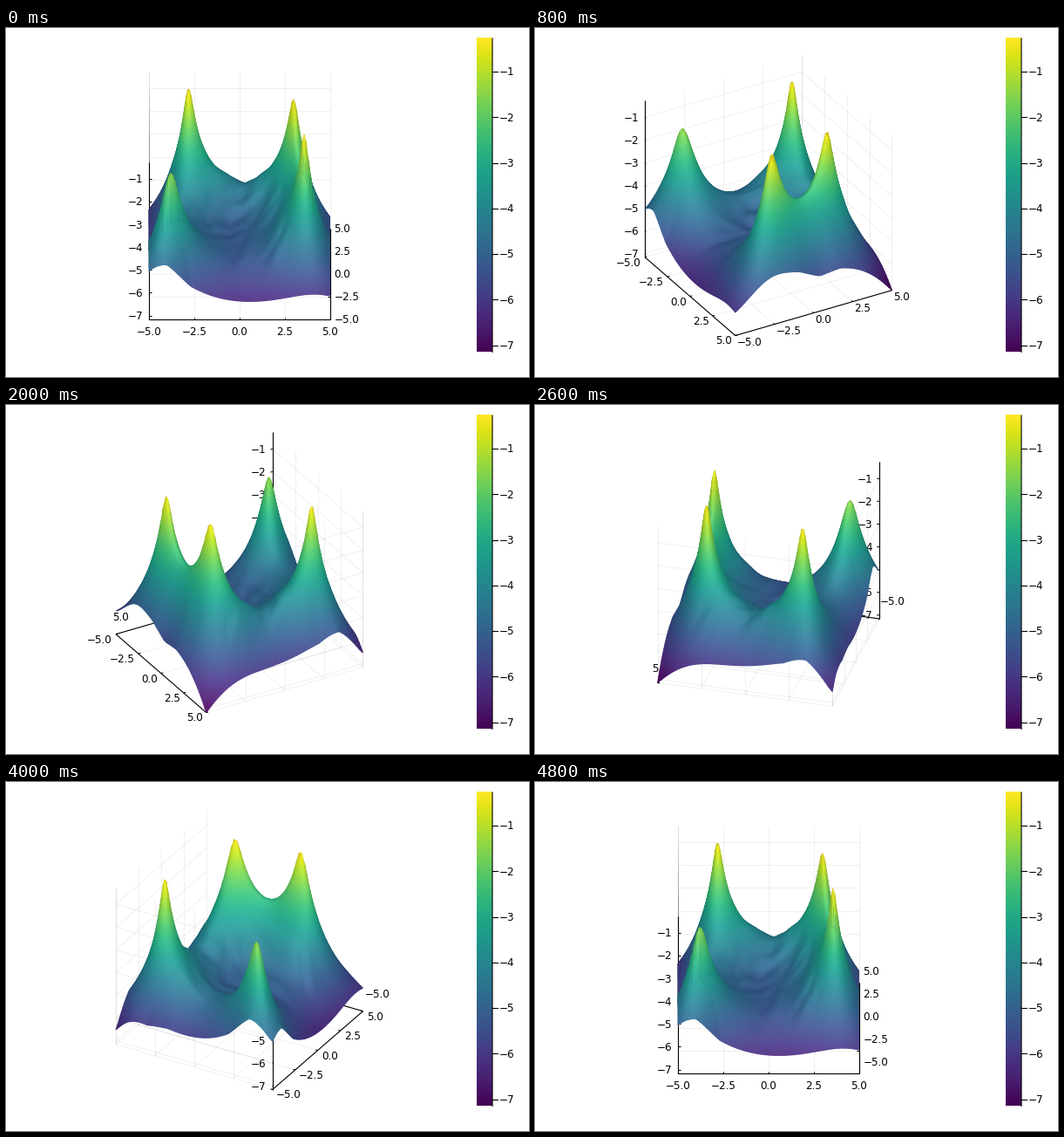
Write a matplotlib script that moves like this. It is 600 by 400 pixels and loops after 4870 ms.

```python
import numpy as np
import matplotlib.pyplot as plt
from matplotlib.animation import FuncAnimation
from matplotlib.collections import LineCollection, TriMesh
from matplotlib.tri import Triangulation

POSES, LOOP_MS = 73, 4870
HOLD = 3                                  # ticks per camera pose
STEP_DEG, ELEVATION = 5, np.radians(30)
CX, CY, HALF = 267.75, 191.8, 103.75      # cube centre and half side in pixels
Z_MIN, Z_MAX = -7.153, -0.262
CMAP = plt.get_cmap("viridis")
FONT_PT = 8.64


def norm_z(z):
    return 2 * (z - Z_MIN) / (Z_MAX - Z_MIN) - 1


def project(p, az):
    """Orthographic view of points in the cube [-1, 1]^3."""
    x, y, z = np.moveaxis(np.asarray(p, float), -1, 0)
    depth = np.sin(az) * x - np.cos(az) * y
    sx = CX + HALF * (np.cos(az) * x + np.sin(az) * y)
    sy = CY + HALF * (np.sin(ELEVATION) * depth - np.cos(ELEVATION) * z)
    return np.stack([sx, sy], axis=-1)


# ---- surface ----

def grid_line(n):
    """Grid positions that crowd together where the peaks are."""
    t = np.linspace(-5, 5, 2001)
    total = np.cumsum(1 + 1.8 * np.exp(-((np.abs(t) - 3) / 0.9) ** 2))
    total = (total - total[0]) / (total[-1] - total[0])
    return np.interp(np.linspace(0, 1, n), total, t)


def hat(t):
    return np.clip(1 - np.abs(t), 0, None)


def border_shift(x, y):
    """Lift or drop towards the corners, plus a few bends on the border."""
    u, v = x / 5, y / 5
    out = (0.02 - 0.065 * u - 0.325 * v) * np.abs(u * v) ** 4
    for px, py, amp in [(-4, -5, .35), (-5, -3.5, .3), (-3.5, 5, .3),
                        (5, .4, -.25), (-5, 3, -.2)]:
        out += amp * hat(np.hypot(x - px, y - py) / 1.3)
    return out


def creases(x, y):
    """Short straight folds in the valley."""
    rng = np.random.default_rng(4)
    out = np.zeros_like(x)
    for _ in range(36):
        px, py = rng.uniform(-3.5, 3.5, 2)
        ang = rng.uniform(0.2, 1.5)
        across = (x - px) * np.sin(ang) - (y - py) * np.cos(ang)
        along = (x - px) * np.cos(ang) + (y - py) * np.sin(ang)
        amp = rng.uniform(0.08, 0.18) * rng.choice([-1, 1])
        out += amp * hat(across / rng.uniform(.35, .7)) * hat(along / rng.uniform(1.2, 2.6))
    return out


def height(x, y):
    f = (x * x + y - 11) ** 2 + (x + y * y - 7) ** 2
    low_peak = 3 * np.exp(-((x + 3.78) ** 2 + (y + 3.28) ** 2) / 0.3)
    inside = np.clip((5 - np.maximum(np.abs(x), np.abs(y))) / 1.4, 0, 1)
    valley = np.clip(np.log(f + 1) - 3.3, 0, 1)
    z = -np.log(f + 1.31 + low_peak) + border_shift(x, y) + creases(x, y) * inside * valley
    return np.clip(z, Z_MIN, Z_MAX)


N = 74
line = grid_line(N)
gx, gy = np.meshgrid(line, line, indexing="ij")
gz = norm_z(height(gx, gy))
points = np.stack([gx / 5, gy / 5, gz], axis=-1).reshape(-1, 3)
slope_x, slope_y = np.gradient(gz, line / 5, line / 5)
normals = np.stack([-slope_x, -slope_y, np.ones_like(gz)], axis=-1).reshape(-1, 3)
normals /= np.linalg.norm(normals, axis=1, keepdims=True)
base_rgb = CMAP((points[:, 2] + 1) / 2)[:, :3]

ids = np.arange(N * N).reshape(N, N)
a, b, c, d = ids[:-1, :-1], ids[1:, :-1], ids[1:, 1:], ids[:-1, 1:]
cells = np.stack([np.stack([a, b, c], -1), np.stack([a, c, d], -1)], axis=2)


def visible_triangles(az, flat):
    """Triangles that face the viewer, from back to front."""
    si = 1 if np.sin(az) >= 0 else -1
    sj = 1 if np.cos(az) <= 0 else -1
    tris = cells[::si, ::sj].reshape(-1, 3)
    p, q, r = (flat[tris[:, i]] for i in range(3))
    u, v = q - p, r - p
    area = v[:, 0] * u[:, 1] - u[:, 0] * v[:, 1]
    return np.ascontiguousarray(tris[area > 0.1], dtype=np.int32)


def lit_colors(az):
    flat = np.cos(ELEVATION)
    view = np.array([np.sin(az) * flat, -np.cos(az) * flat, np.sin(ELEVATION)])
    facing = np.clip(normals @ view, 0, 1)[:, None]
    rgb = base_rgb * (0.8 + 0.2 * facing) + 0.1 * facing ** 4
    return np.hstack([np.clip(rgb, 0, 1), np.ones((len(rgb), 1))])


# ---- axes, grid and ticks in cube coordinates ----

XY_TICKS = np.arange(-5, 5.1, 2.5)
Z_TICKS = np.arange(-1, -8, -1)
TICK = 0.025

grid, ticks = [], []
for t in XY_TICKS / 5:
    grid += [[(t, -1, -1), (t, 1, -1)], [(t, 1, -1), (t, 1, 1)],
             [(-1, t, -1), (1, t, -1)], [(-1, t, -1), (-1, t, 1)]]
    ticks += [[(t, -1, -1), (t, -1 + TICK, -1)], [(1, t, -1), (1 - TICK, t, -1)]]
for t in norm_z(Z_TICKS):
    grid += [[(-1, -1, t), (-1, 1, t)], [(-1, 1, t), (1, 1, t)]]
    ticks.append([(-1, -1, t), (-1 + TICK, -1, t)])
edges = [[(-1, -1, -1), (1, -1, -1)], [(1, -1, -1), (1, 1, -1)],
         [(-1, -1, -1), (-1, -1, 1)]]


def label_place(ang):
    """Offset and alignment of floor labels for the angle of their edge."""
    s, k = np.sin(ang), np.cos(ang)
    rise = np.sqrt(abs(k))
    if abs(s) < 1e-9:
        return 0, (14 if k > 0 else -20), "center"
    dy = 8 * rise if k > 0 else -13 - 7.2 * rise
    if s > 0 and k > 0:
        return -6 * s + 1, dy, "right"
    return -6 * s - 1, dy, "left"


def number(v, digits):
    return f"{v:.{digits}f}".replace("-", "\u2212")


# ---- stage ----

fig = plt.figure(figsize=(6, 4), dpi=100, facecolor="white")
ax = fig.add_axes([0, 0, 1, 1])
ax.axis("off")

ax.imshow(np.linspace(1, 0, 256)[:, None], cmap=CMAP, aspect="auto",
          extent=(540, 558, 371.5, 12), interpolation="bilinear")
ax.set_xlim(0, 600)
ax.set_ylim(400, 0)


def label(text, x=0, y=0, ha="left"):
    return ax.text(x, y, text, ha=ha, va="baseline", fontsize=FONT_PT,
                   family="DejaVu Sans", color="black", zorder=2)


ax.plot([558, 558], [12, 371.5], color="black", lw=0.8, snap=False)
for v in Z_TICKS:
    y = 191.5 - 180 * norm_z(v)
    ax.plot([558, 564], [y, y], color="black", lw=0.8)
    label(number(v, 0), 565.5, y + 4.3)

grid_lines = LineCollection([], colors="black", alpha=0.06, linewidths=0.7, zorder=1)
axis_lines = LineCollection([], colors="black", linewidths=0.8, zorder=2)
start = project(points, 0)
tri = Triangulation(*start.T, visible_triangles(0, start))
surface = TriMesh(tri, zorder=3)
for artist in (grid_lines, axis_lines, surface):
    ax.add_collection(artist, autolim=False)

x_labels = [label(number(v, 1)) for v in XY_TICKS]
y_labels = [label(number(v, 1)) for v in XY_TICKS]
z_labels = [label(number(v, 0), ha="right") for v in Z_TICKS]


def place(labels, spots, dx, dy, ha):
    for text, (sx, sy) in zip(labels, spots):
        text.set_position((sx + dx, sy + dy + 4.3))
        text.set_ha(ha)


def draw(tick):
    # the first pose is one tick short, the last one tick long
    pose = min((tick + 1) // HOLD, POSES - 1)
    az = np.radians(STEP_DEG * pose)
    grid_lines.set_segments(project(grid, az))
    axis_lines.set_segments(project(edges + ticks, az))

    along = XY_TICKS / 5
    place(x_labels, project([(t, -1, -1) for t in along], az), *label_place(az))
    place(y_labels, project([(1, t, -1) for t in along], az),
          *label_place(az - np.pi / 2))
    place(z_labels, project([(-1, -1, t) for t in norm_z(Z_TICKS)], az),
          -7, 0, "right")

    flat = project(points, az)
    tri.x, tri.y = flat.T
    tri.triangles = visible_triangles(az, flat)
    surface.set_facecolor(lit_colors(az))
    return [grid_lines, axis_lines, surface, *x_labels, *y_labels, *z_labels]


TICKS = POSES * HOLD
anim = FuncAnimation(fig, draw, frames=TICKS, interval=LOOP_MS / TICKS,
                     repeat=True, repeat_delay=0, blit=False)
plt.show()
```
